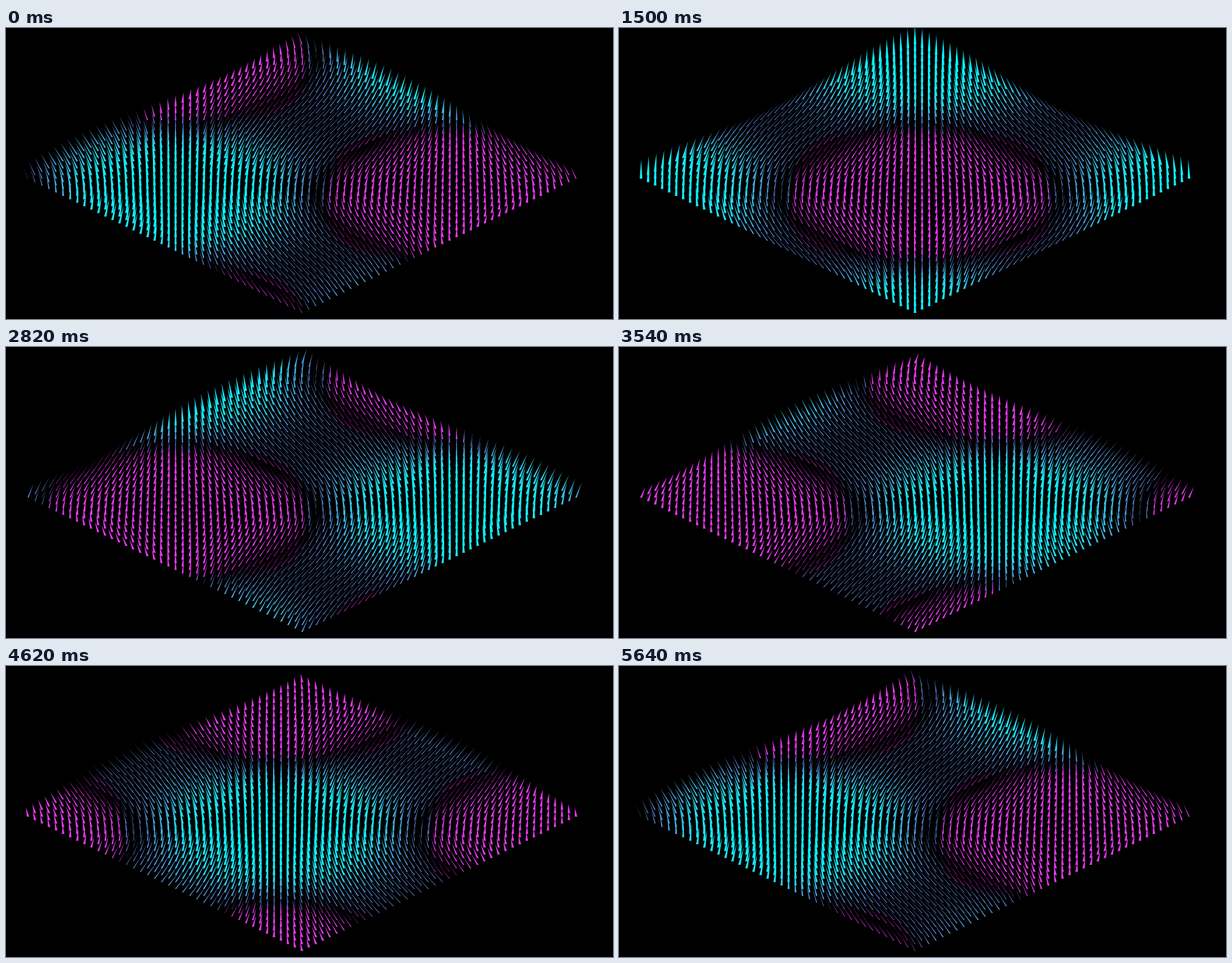
Recreate the animation shown at these times as an HTML page with a canvas. Size 1000x480 px, loop 5.7 s.

```html
<!DOCTYPE html>
<html lang="en">
<head>
<meta charset="utf-8">
<title>Wave field</title>
<style>
  html, body { margin: 0; width: 100%; height: 100%; overflow: hidden; background: #000; }
  canvas { display: block; }
</style>
</head>
<body>
<canvas id="stage" width="1000" height="480"></canvas>
<script>
const ctx = document.getElementById('stage').getContext('2d');

const GRID = 40, STEP_X = 11.575, STEP_Y = 5.68;
const CENTER_X = 487.7, CENTER_Y = 248.5;
const LOOP = 5700, TICK = 60, PERIOD = 5640;
const PHASE_X = 743, PHASE_Y = 280.5;
const REST_HEIGHT = 23, RISE = 9.5, LEAN = 22, MAX_WIDTH = 4.2;

// Colour stops along the wave height
const STOPS = [
  [-0.16, [232, 56, 240]],
  [-0.11, [100, 136, 228]],
  [0.06, [96, 142, 226]],
  [0.5, [30, 226, 242]],
  [0.9, [8, 245, 255]]
];

function colorAt(height) {
  const next = STOPS.findIndex(stop => stop[0] > height);
  if (next === 0) return `rgb(${STOPS[0][1]})`;
  if (next < 0) return `rgb(${STOPS[STOPS.length - 1][1]})`;
  const [h0, c0] = STOPS[next - 1], [h1, c1] = STOPS[next];
  const k = (height - h0) / (h1 - h0);
  return `rgb(${c0.map((v, n) => Math.round(v + (c1[n] - v) * k))})`;
}

function drawSpike(x, y, time) {
  const u = Math.PI * (x - PHASE_X) / (GRID * STEP_X) + 2 * Math.PI * time / PERIOD;
  const v = Math.PI * (y - PHASE_Y) / (GRID * STEP_Y);
  const height = -Math.cos(u) * Math.cos(v);
  const lean = Math.sin(u) * Math.sin(v);

  // Spikes thin out near their rest length and when they lean far over
  const stretch = Math.abs(height + 0.45 * lean * lean);
  const half = MAX_WIDTH / 2 * Math.min(1, 1.3 * Math.sqrt(stretch)) * (1 - 0.65 * lean * lean);

  ctx.fillStyle = colorAt(height);
  ctx.beginPath();
  ctx.moveTo(x - half, y);
  ctx.lineTo(x + half, y);
  ctx.lineTo(x + LEAN * lean, y - REST_HEIGHT - RISE * height);
  ctx.fill();
}

function render(now) {
  const time = Math.floor(now % LOOP / TICK) * TICK;
  ctx.fillStyle = '#000';
  ctx.fillRect(0, 0, 1000, 480);
  for (let i = 0; i < GRID; i++) {
    for (let j = 0; j < GRID; j++) {
      drawSpike(CENTER_X + (i - j) * STEP_X, CENTER_Y + (i + j - GRID + 1) * STEP_Y, time);
    }
  }
}

function loop() {
  render(performance.now());
  requestAnimationFrame(loop);
}
loop();
</script>
</body>
</html>
```
